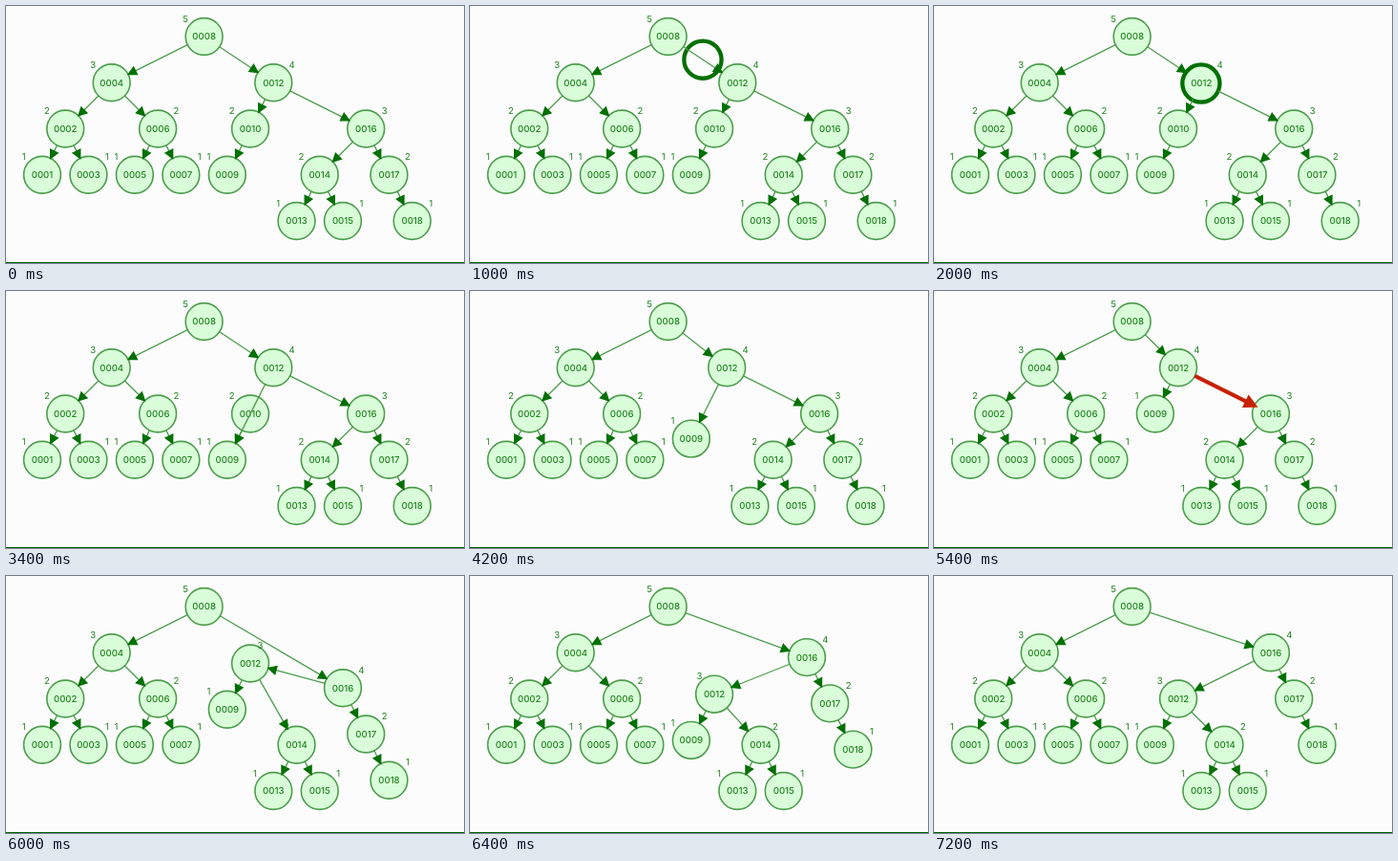
An HTML page with a canvas for the animation above (8330 ms loop, 480 by 269 pixels).

```html
<!DOCTYPE html>
<html lang="en">
<head>
<meta charset="utf-8">
<title>AVL tree deletion</title>
<style>
  html, body { margin: 0; width: 100%; height: 100%; overflow: hidden; background: #fcfcfc; }
  canvas { display: block; width: 100vw; height: 100vh; }
</style>
</head>
<body>
<canvas id="stage"></canvas>
<script>
const W = 480, H = 269, LOOP = 8330, TICK = 200;
const START = 55, BEAT = 645, MOVE = 600;
const R = 19.4, GAP_X = 24.23, GAP_Y = 48.25;
const GREEN = '#007000', SOFT = '#4d9d4d', INK = '#1f821f', RED = '#c82000', PAPER = '#fcfcfc';

// Every step lasts one beat
const RELINK = 5, RESIZE = 6, LIGHT_EDGE = 8, ROTATE = 9;
const HALO = { 0: 8, 2: 12, 4: 10, 7: 12 };
const RING = { 1: [8, 12], 3: [12, 10] };

const canvas = document.getElementById('stage');
const ctx = canvas.getContext('2d');

const clamp = v => Math.max(0, Math.min(1, v));
const mix = (a, b, k) => a + (b - a) * k;

function insert(node, key) {
  if (!node) return { key };
  const side = key < node.key ? 'left' : 'right';
  node[side] = insert(node[side], key);
  return node;
}

// In-order rank gives the column, depth gives the row
function layout(keys) {
  const root = keys.reduce(insert, null);
  const nodes = {}, edges = [];
  let rank = 0;
  function visit(node, depth, side) {
    if (!node) return 0;
    const { key, left, right } = node;
    const leftHeight = visit(left, depth + 1, -1);
    const x = 38 + GAP_X * rank++, y = 32 + GAP_Y * depth;
    const height = 1 + Math.max(leftHeight, visit(right, depth + 1, 1));
    nodes[key] = { x, y, lx: x + side * R, ly: y - 18.6, height };
    for (const child of [left, right]) if (child) edges.push([key, child.key]);
    return height;
  }
  visit(root, 0, -1);
  return { nodes, edges };
}

const keys = [8, 4, 12, 2, 6, 10, 16, 1, 3, 5, 7, 9, 14, 17, 13, 15, 18];
const kept = keys.filter(key => key !== 10);
const swapped = kept.map(key => key === 12 ? 16 : key === 16 ? 12 : key);
const before = layout(keys), removed = layout(kept), rotated = layout(swapped);

function blend(from, to, k) {
  const nodes = {};
  for (const key in to.nodes) {
    const a = from.nodes[key], b = to.nodes[key];
    nodes[key] = { height: b.height };
    for (const p of ['x', 'y', 'lx', 'ly']) nodes[key][p] = mix(a[p], b[p], k);
  }
  return nodes;
}

function sceneAt(step, k) {
  if (step < RELINK) return before;
  if (step < RESIZE) return { nodes: before.nodes, edges: [...removed.edges, [10, 9]] };
  if (step < ROTATE) return { nodes: blend(before, removed, step === RESIZE ? k : 1), edges: removed.edges };
  return { nodes: blend(removed, rotated, step === ROTATE ? k : 1), edges: rotated.edges };
}

// Triangle wave between 3 and 7
function pulse(t) {
  const phase = ((t + 1560) % 1680) / 1680;
  return 3 + 4 * Math.abs(1 - 2 * phase);
}

function disc(x, y, r) {
  ctx.beginPath();
  ctx.arc(x, y, r, 0, Math.PI * 2);
}

function text(str, x, y, weight) {
  ctx.font = `${weight} 9.6px Inter, "Liberation Sans", sans-serif`;
  ctx.fillStyle = INK;
  ctx.fillText(str, x, y);
}

function drawNode(key, n, halo) {
  if (halo) {
    disc(n.x, n.y, R + halo);
    ctx.fillStyle = '#fa0a00';
    ctx.fill();
  }
  disc(n.x, n.y, R);
  ctx.fillStyle = '#d9fdd9';
  ctx.fill();
  ctx.lineWidth = 1.6;
  ctx.strokeStyle = SOFT;
  ctx.stroke();
  text(String(key).padStart(4, '0'), n.x, n.y + 0.6, 500);
}

function drawArrow(a, b, width, line, head) {
  const d = Math.hypot(b.x - a.x, b.y - a.y) || 1;
  const ux = (b.x - a.x) / d, uy = (b.y - a.y) / d;
  const x = b.x - ux * R, y = b.y - uy * R;
  const bx = x - ux * 8.4, by = y - uy * 8.4, w = 4.3;
  ctx.lineWidth = width;
  ctx.strokeStyle = line;
  ctx.beginPath();
  ctx.moveTo(a.x + ux * R, a.y + uy * R);
  ctx.lineTo(x, y);
  ctx.stroke();
  ctx.beginPath();
  ctx.moveTo(x, y);
  ctx.lineTo(bx - uy * w, by + ux * w);
  ctx.lineTo(bx + uy * w, by - ux * w);
  ctx.closePath();
  ctx.fillStyle = ctx.strokeStyle = head;
  ctx.fill();
  ctx.stroke();
}

function drawRing(a, b, k) {
  disc(mix(a.x, b.x, k), mix(a.y, b.y, k), R + 0.2);
  ctx.lineWidth = 4.3;
  ctx.strokeStyle = GREEN;
  ctx.stroke();
}

function draw(t) {
  const step = Math.floor((t - START) / BEAT);
  const k = clamp((t - START - step * BEAT) / MOVE);
  const { nodes, edges } = sceneAt(step, k);
  const halo = HALO[step], ring = RING[step];

  ctx.fillStyle = PAPER;
  ctx.fillRect(0, 0, W, H);
  ctx.fillStyle = '#006400';
  ctx.fillRect(0, 268, W, 1);
  ctx.textAlign = 'center';
  ctx.textBaseline = 'middle';
  ctx.textRendering = 'geometricPrecision';

  for (const key in nodes) {
    const n = nodes[key];
    if (+key !== halo) drawNode(key, n, 0);
    text(n.height, n.lx, n.ly + 0.4, 400);
  }
  if (halo) drawNode(halo, nodes[halo], pulse(t));
  if (ring) drawRing(nodes[ring[0]], nodes[ring[1]], k);

  for (const [a, b] of edges) {
    const lit = step === LIGHT_EDGE && a === 12 && b === 16;
    if (lit) drawArrow(nodes[a], nodes[b], 4, RED, RED);
    else drawArrow(nodes[a], nodes[b], 1.3, SOFT, GREEN);
  }
}

function resize() {
  const dpr = window.devicePixelRatio || 1;
  canvas.width = Math.round(innerWidth * dpr);
  canvas.height = Math.round(innerHeight * dpr);
  ctx.setTransform(canvas.width / W, 0, 0, canvas.height / H, 0, 0);
}

const start = performance.now();

function frame() {
  const t = (performance.now() - start) % LOOP;
  draw(Math.floor(t / TICK) * TICK);
  requestAnimationFrame(frame);
}

addEventListener('resize', resize);
resize();
frame();
</script>
</body>
</html>
```
